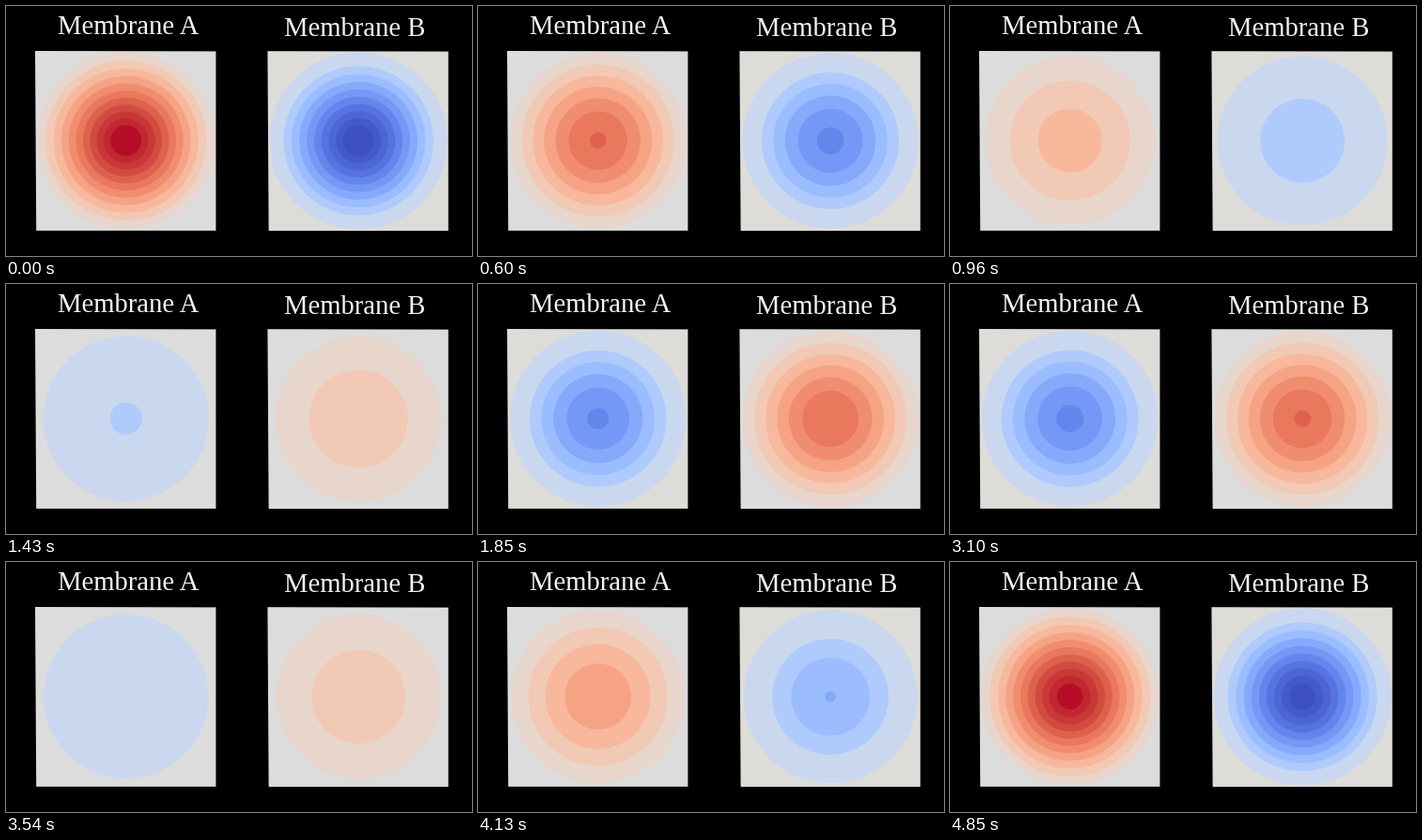
A matplotlib script for the animation above (5 s loop, 496 px wide and 267 px high).

```python
import numpy as np
import matplotlib.pyplot as plt
from matplotlib.animation import FuncAnimation
from matplotlib.patches import Circle, Polygon

W, H, DPI = 496, 267, 100
LOOP, STEP = 5000, 10
RADIUS = 97        # where the membrane is at rest
LEAD = 20          # ms, phase lead of the swing
FAINT = 0.03       # height where the first tint shows

# Heights of the colour bands, packed closer towards the peak
WARM = np.sin(np.arange(FAINT, 1.3, 0.125))
COOL = np.append(FAINT, np.sin(np.arange(0.24, 1.4, 0.13)))

# The picture rests near each peak and each zero crossing
HOLDS = [(0, 150), (1140, 1270), (2350, 2650), (3610, 3740), (4850, LOOP)]

SHEET = np.array([(31, 48), (223.4, 48.4), (223.4, 239.9), (32.2, 239.9)])
CENTER = np.array([127.7, 143.7])


def bessel0(x):
    angles = (np.arange(200) + 0.5) * np.pi / 200
    return np.cos(np.outer(x, np.sin(angles))).mean(axis=1)


RADII = np.linspace(0, RADIUS, 400)
PROFILE = bessel0(2.4048 * RADII / RADIUS)


def radius_at(height):
    """Radius at which the unit profile has the given height."""
    return np.interp(height, PROFILE[::-1], RADII[::-1])


def swing_at(time):
    for start, end in HOLDS:
        if start <= time < end:
            time = start
    return np.cos(2 * np.pi * (time + LEAD) / LOOP)


class Membrane:
    def __init__(self, ax, shift):
        self.sheet = ax.add_patch(Polygon(SHEET + shift, lw=0))
        center = CENTER + shift
        self.bands = {1: self.make_bands(ax, center, WARM, 1),
                      -1: self.make_bands(ax, center, COOL, -1)}

    @staticmethod
    def make_bands(ax, center, bounds, sign):
        middles = (bounds + np.append(bounds[1:], 1)) / 2
        colors = plt.cm.coolwarm(0.5 + sign * middles / 2)
        return [(bound, ax.add_patch(Circle(center, 1, fc=color, lw=0)))
                for bound, color in zip(bounds, colors)]

    def show(self, swing):
        self.sheet.set_facecolor("#dddcd9" if swing < -0.3 else "#dcdcdc")
        for sign, bands in self.bands.items():
            height = sign * swing
            for bound, disc in bands:
                visible = height > bound
                disc.set_visible(visible)
                if visible:
                    disc.set_radius(radius_at(bound / height))


fig = plt.figure(figsize=(W / DPI, H / DPI), dpi=DPI, facecolor="black")
ax = fig.add_axes([0, 0, 1, 1])
ax.set_xlim(0, W)
ax.set_ylim(H, 0)
ax.axis("off")

for x, y, title in [(55, 30.5, "Membrane A"), (296, 31.5, "Membrane B")]:
    ax.text(x, y, title, color="#f4f4f4", family="Liberation Serif",
            size=20.6, va="baseline")

left = Membrane(ax, (0, 0))
right = Membrane(ax, (247.4, 0.2))


def update(i):
    swing = swing_at(i * STEP)
    left.show(swing)
    right.show(-swing)
    return []


anim = FuncAnimation(fig, update, frames=LOOP // STEP, interval=STEP,
                     repeat=True, repeat_delay=0)
plt.show()
```
